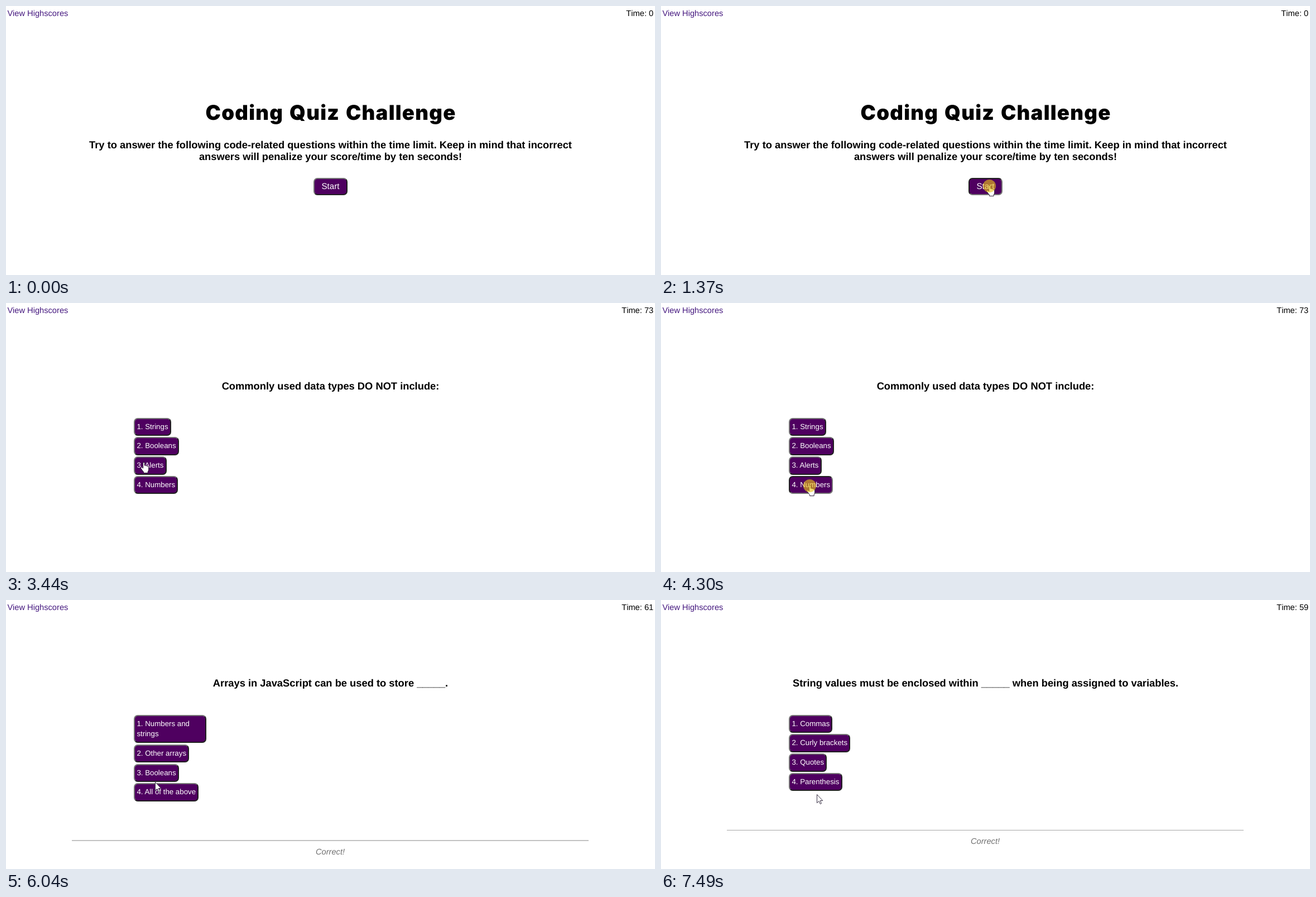
An HTML page that plays this animation: 1163 px wide and 482 px high, repeating every 8 s.

```html
<!DOCTYPE html>
<html lang="en">
<head>
<meta charset="utf-8">
<title>Coding Quiz</title>
<style>
  html, body { margin: 0; width: 100%; height: 100%; overflow: hidden; background: #fff; }
  body {
    position: relative; color: #000;
    font: 14.66px/20px "Liberation Sans", Arial, sans-serif;
    text-rendering: geometricPrecision;
  }
  #stage { position: absolute; inset: 0; width: 1163px; height: 482px; overflow: hidden; }
  #stage > * { position: absolute; margin: 0; }
  [hidden] { display: none !important; }

  #link { left: 2.5px; top: 4px; color: #45187f; }
  #time { right: 2.8px; top: 4px; font-kerning: none; }

  #intro { inset: 0; }
  #intro > * { position: absolute; margin: 0; left: 0; width: 100%; text-align: center; }
  h1 {
    top: 171px; font: 900 36.6px/40px Inter, "Open Sans", sans-serif;
    letter-spacing: 1.25px; word-spacing: 2.4px; text-indent: 1.25px;
  }
  h3 { font-size: 18.32px; line-height: 20.8px; }
  #intro h3 { top: 239.4px; }
  #question { top: 138.6px; left: 0; width: 100%; text-align: center; }

  .btn {
    box-sizing: border-box; color: #fff; background: #4f0060;
    border: 2px solid; border-color: #767676 #212121 #212121 #767676;
    border-radius: 7px;
  }
  .btn.down { border-color: #212121 #767676 #767676 #212121; }
  #intro .btn { left: 551px; top: 308px; width: 61px; height: 31px; font-size: 15.2px; line-height: 27px; }

  #choices {
    left: 229.3px; top: 205.6px;
    display: flex; flex-direction: column; align-items: flex-start; gap: 2.4px;
  }
  #choices .btn { max-width: 130px; padding: 5px 3.1px; font-size: 13.3px; line-height: 18.4px; }

  #feedback { left: 118px; width: 926px; border-top: 1px solid #a8a8a8; }
  #feedback.low { border-top: 2px solid #c2c2c2; }
  #feedback p { position: absolute; left: 0; width: 100%; top: 10.4px; margin: 0; text-align: center; font-style: italic; color: #707070; }

  #pointer { left: 0; top: 0; width: 40px; height: 40px; overflow: visible; }
  #pointer path { stroke-linejoin: round; fill: #fff; }
</style>
</head>
<body>
<div id="stage">
  <div id="link">View Highscores</div>
  <div id="time"></div>

  <div id="intro">
    <h1>Coding Quiz Challenge</h1>
    <h3>Try to answer the following code-related questions within the time limit. Keep in mind that incorrect<br>answers will penalize your score/time by ten seconds!</h3>
    <div class="btn" id="start">Start</div>
  </div>

  <h3 id="question"></h3>
  <div id="choices"></div>
  <div id="feedback"><p></p></div>

  <svg id="pointer">
    <path id="arrow" stroke="#3b3347" d="M.5 .5V15.6L4 12.4 6.4 17.6 8.5 16.6 6.2 11.5H10.8Z"/>
    <path id="hand" stroke="#1c0a24" stroke-width=".9" d="M-1.4 11V1.9Q-1.4 .4 0 .4T1.4 1.9V6.2Q3 5.3 4 6.9 5.5 6.2 6.5 7.7 8.7 7.2 8.7 9.6V13.2Q8.7 15.6 7.2 17.2V19.6H-.4V17.6Q-2.6 15.4-5.1 11.6-5.8 10.2-4.7 9.6-3.4 9.1-1.4 11Z"/>
    <circle id="halo" cx="-.5" cy="1.5" r="11.5" fill="#ebc319" fill-opacity=".62"/>
  </svg>
</div>

<script>
const LOOP = 8000;
const $ = id => document.getElementById(id);

const questions = [
  ['Commonly used data types DO NOT include:', 'Strings', 'Booleans', 'Alerts', 'Numbers'],
  ['The condition in an if/else statement is enclosed within _____.', 'Quotes', 'Curly Brackets', 'Square Brackets', 'Parenthesis'],
  ['Arrays in JavaScript can be used to store _____.', 'Numbers and strings', 'Other arrays', 'Booleans', 'All of the above'],
  ['String values must be enclosed within _____ when being assigned to variables.', 'Commas', 'Curly brackets', 'Quotes', 'Parenthesis']
];

// Each track lists [start, value]; a value holds until the next start.
const page = [[0, -1], [1440, 0], [4430, 1], [6040, 2], [7490, 3]];
const clock = [[0, 0], [2460, 74], [3440, 73], [4430, 62], [5450, 61], [6440, 60], [7490, 59]];
const verdict = [[0, ''], [4430, 'Wrong!'], [5450, ''], [6040, 'Correct!'], [7030, ''], [7490, 'Correct!']];
const press = [[0, 0], [1300, 1], [1440, 0], [4300, 1], [4430, 0], [5910, 1], [6040, 0], [7360, 1], [7490, 0]];
const shape = [[0, ''], [130, 'arrow'], [780, 'hand'], [1440, 'arrow'], [3170, 'hand'], [6040, 'arrow'], [6900, 'hand'], [7490, 'arrow']];

// Pointer moves: the mouse is sampled in even steps along a polyline.
const moves = [
  { from: 130, to: 910, steps: 12, pts: [[905, 403], [815, 300], [720, 253], [630, 285], [576, 320], [585, 316]] },
  { from: 910, to: 1030, steps: 2, pts: [[585, 316], [589, 321]] },
  { from: 2715, to: 3240, steps: 8, pts: [[589, 321], [510, 331], [400, 325], [290, 298], [247, 285]] },
  { from: 3440, to: 3900, steps: 6, pts: [[247, 285], [256, 304], [267, 326]] },
  { from: 6900, to: 7100, steps: 3, pts: [[271, 334], [279, 348]] }
];

const at = (track, t) => track.filter(([start]) => start <= t).pop()[1];

function pointerAt(t) {
  const move = moves.filter(m => m.from <= t).pop() || moves[0];
  const { from, to, steps, pts } = move;
  const raw = Math.min(1, Math.max(0, (t - from) / (to - from)));
  const pos = Math.floor(raw * steps + 1e-6) / steps * (pts.length - 1);
  const i = Math.min(Math.floor(pos), pts.length - 2);
  return [0, 1].map(k => pts[i][k] + (pts[i + 1][k] - pts[i][k]) * (pos - i));
}

let shown;
function showPage(n) {
  if (n === shown) return;
  shown = n;
  $('intro').hidden = n >= 0;
  $('question').hidden = $('choices').hidden = n < 0;
  if (n < 0) return;
  const [title, ...answers] = questions[n];
  $('question').textContent = title;
  $('choices').replaceChildren(...answers.map((text, i) => {
    const btn = document.createElement('div');
    btn.className = 'btn';
    btn.textContent = `${i + 1}. ${text}`;
    return btn;
  }));
}

function draw(t) {
  const n = at(page, t), down = !!at(press, t), kind = at(shape, t), text = at(verdict, t);
  showPage(n);
  $('time').textContent = 'Time: ' + at(clock, t);

  const target = n < 0 ? $('start') : $('choices').lastChild;
  target.classList.toggle('down', down);

  const low = n === 2;
  const fb = $('feedback');
  fb.hidden = !text;
  fb.classList.toggle('low', low);
  fb.style.top = (low ? 430 : 412) + 'px';
  fb.firstChild.textContent = text;

  const [x, y] = pointerAt(t).map(Math.round);
  $('pointer').style.transform = `translate(${x}px, ${y}px)`;
  for (const id of ['arrow', 'hand']) $(id).style.display = id === kind ? '' : 'none';
  $('halo').style.display = down ? '' : 'none';
}

const origin = performance.now();
function tick() {
  draw((performance.now() - origin) % LOOP);
  requestAnimationFrame(tick);
}
tick();
</script>
</body>
</html>
```
